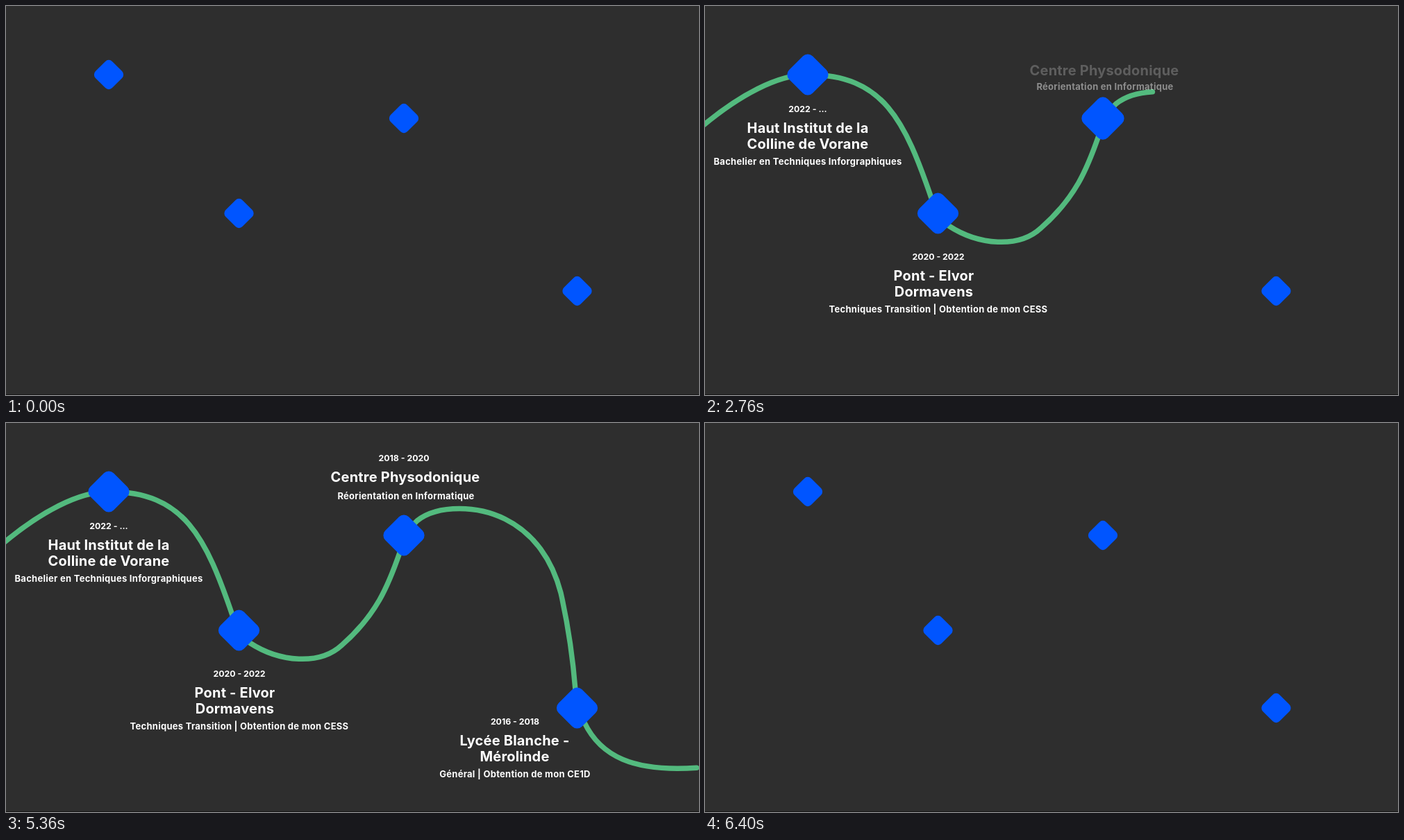
These frames come from a looping animation (998x561 px, 6.6 s). An HTML page:

```html
<!DOCTYPE html>
<html lang="fr">
<head>
<meta charset="utf-8">
<title>Parcours</title>
<style>
  html, body { margin: 0; width: 100%; height: 100%; overflow: hidden; background: #2e2e2e; }
  svg { display: block; width: 100%; height: 100%; }
  text { fill: #fff; font-family: Inter, "Open Sans", sans-serif; font-weight: 700; text-anchor: middle; }
  .date { font-size: 12.3px; }
  .title { font-size: 20px; letter-spacing: .2px; }
  .desc { font-size: 13px; letter-spacing: .27px; }
</style>
</head>
<body>
<svg id="stage" viewBox="0 0 998 561">
  <rect width="998" height="561" fill="#2e2e2e"/>
  <rect y="560" width="998" height="1" fill="#161616"/>
  <path id="road" fill="none" stroke="#53ba7e" stroke-width="7.5" stroke-linecap="round" d="
    M-6 175 C50 128 105 99 148 99
    C257 99 288 165 327 280
    C332 295 338 308 351 317
    C394 345 452 350 484 320
    C533 277 550 236 567 187
    C573 170 579 153 592 141
    C607 129 630 123.5 653 123.5
    C700 123.5 742 144 770 182
    C784 201 793 222 799 245
    C808 285 816 335 820 385
    C821 402 825 418 833 432
    C857 482 906 505 1004 496.5"/>
</svg>
<script>
const LOOP = 6600, STEP = 40;
const FADE = 440, STAGGER = 100, TEXT_BACK = 2;
const SPRING = 1000, SPRING_BACK = 3.56;

// start: reveal time; gemEnd, textEnd: times when each is fully reset
const stops = [
  { x: 148, y: 99, start: 1290, gemEnd: 6215, textEnd: 6395, shift: -22,
    date: ["2022 - ...", 148, 148],
    title: [["Haut Institut de la", 148, 176], ["Colline de Vorane", 148, 198.5]],
    desc: ["Bachelier en Techniques Inforgraphiques", 148, 224] },
  { x: 335.5, y: 299, start: 1970, gemEnd: 6026, textEnd: 6235, shift: -22,
    date: ["2020 - 2022", 336, 361],
    title: [["Pont - Elvor", 329.5, 389], ["Dormavens", 329.5, 411.5]],
    desc: ["Techniques Transition | Obtention de mon CESS", 336, 437] },
  { x: 573, y: 162, start: 2560, gemEnd: 5846, textEnd: 6045, shift: 20,
    date: ["2018 - 2020", 573, 50],
    title: [["Centre Physodonique", 575, 78]],
    desc: ["Réorientation en Informatique", 576, 105.5] },
  { x: 822.5, y: 411, start: 3400, gemEnd: 5620, textEnd: 5780, shift: -23,
    date: ["2016 - 2018", 733, 430],
    title: [["Lycée Blanche -", 732.5, 458], ["Mérolinde", 732.5, 480.5]],
    desc: ["Général | Obtention de mon CE1D", 733, 506] }
];

const stage = document.getElementById("stage");
const road = document.getElementById("road");
const clamp = v => Math.max(0, Math.min(1, v));

function add(parent, tag, attrs) {
  const el = document.createElementNS("http://www.w3.org/2000/svg", tag);
  for (const k in attrs) el.setAttribute(k, attrs[k]);
  return parent.appendChild(el);
}

function addLines(kind, lines) {
  const group = add(stage, "g", {});
  const drop = kind === "title" ? 7 : 4.6;
  for (const [label, x, y] of lines)
    add(group, "text", { class: kind, x, y: y + drop }).textContent = label;
  return group;
}

for (const s of stops)
  s.gem = add(stage, "rect", { x: -17, y: -17, width: 34, height: 34, rx: 7, fill: "#0055ff" });
for (const s of stops)
  s.parts = [addLines("desc", [s.desc]), addLines("title", s.title), addLines("date", [s.date])];

// The road always runs rightwards, so x alone identifies a distance along it
function lengthAt(x) {
  let lo = 0, hi = road.getTotalLength();
  for (let i = 0; i < 24; i++) {
    const mid = (lo + hi) / 2;
    if (road.getPointAtLength(mid).x < x) lo = mid; else hi = mid;
  }
  return lo;
}

// Smooth curve through [time, x of the road's tip]
function track(points) {
  const keys = points.map(([t, x]) => [t, lengthAt(x)]);
  const last = keys.length - 1;
  const slope = i => {
    const a = keys[Math.max(0, i - 1)], b = keys[Math.min(last, i + 1)];
    return (b[1] - a[1]) / (b[0] - a[0]);
  };
  return t => {
    if (t <= keys[0][0]) return keys[0][1];
    if (t >= keys[last][0]) return keys[last][1];
    let i = 0;
    while (t > keys[i + 1][0]) i++;
    const [t0, p0] = keys[i], [t1, p1] = keys[i + 1];
    const d = t1 - t0, u = (t - t0) / d, v = 1 - u;
    return v * v * (1 + 2 * u) * p0 + u * u * (3 - 2 * u) * p1
      + d * u * v * (v * slope(i) - u * slope(i + 1));
  };
}

const advance = track([[660, -6], [1000, 69], [1320, 179], [2000, 366], [2760, 644],
  [3360, 812.5], [4040, 950], [4240, 1004]]);
const retreat = track([[5352, 1004], [5720, 770], [6000, 390], [6380, -6]]);

function elastic(u) {
  if (u <= 0) return 0;
  if (u >= 1) return 1;
  return 1 + 2 ** (-10 * u) * Math.sin((u - 0.075) * 2 * Math.PI / 0.3);
}

// Runs forward from start, then backward at a higher rate to reach zero at end
const clock = (t, start, end, rate) => Math.min(t - start, (end - t) * rate);

function draw(t) {
  const len = t < 4800 ? advance(t) : retreat(t);
  road.style.visibility = len > 0.1 ? "visible" : "hidden";
  road.setAttribute("stroke-dasharray", `${len} 4000`);

  for (const s of stops) {
    const scale = 1 + 0.4 * elastic(clock(t, s.start, s.gemEnd, SPRING_BACK) / SPRING);
    s.gem.setAttribute("transform", `translate(${s.x} ${s.y}) rotate(45) scale(${scale})`);
    const age = clock(t, s.start, s.textEnd, TEXT_BACK);
    s.parts.forEach((part, i) => {
      const shown = clamp((age - i * STAGGER) / FADE);
      part.setAttribute("opacity", shown);
      part.setAttribute("transform", `translate(0 ${s.shift * (1 - shown)})`);
    });
  }
}

const begin = performance.now();
function tick() {
  const t = (performance.now() - begin) % LOOP;
  draw(Math.floor(t / STEP) * STEP);
  requestAnimationFrame(tick);
}
tick();
</script>
</body>
</html>
```
